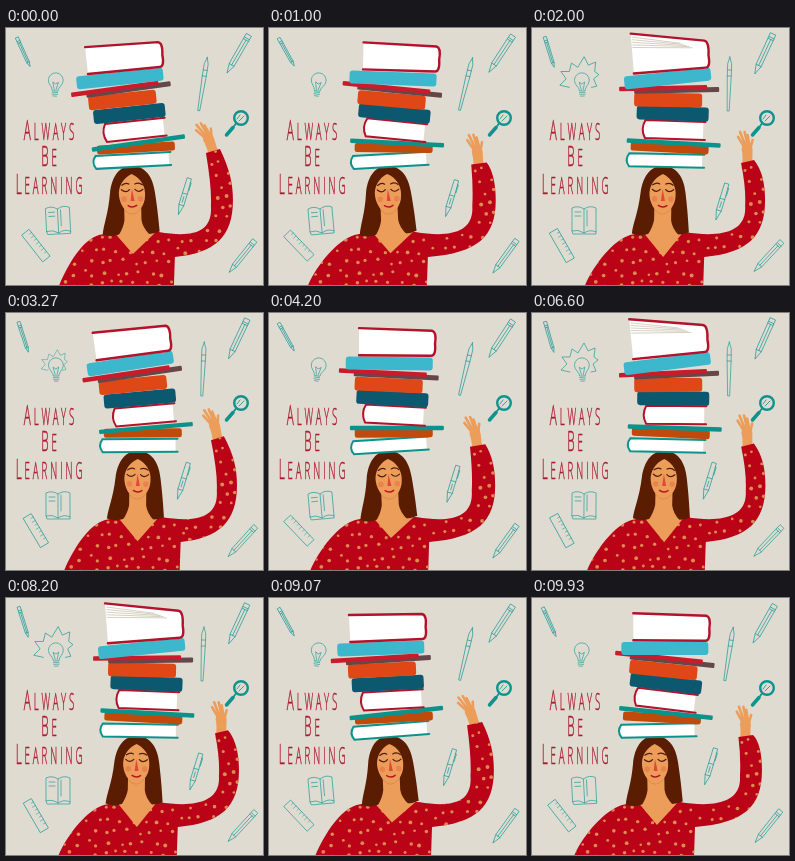
These frames come from a looping animation (257 by 257 pixels, 9990 ms). An HTML page:

```html
<!DOCTYPE html>
<html lang="en">
<head>
<meta charset="utf-8">
<title>Always Be Learning</title>
<style>
  html, body { margin: 0; width: 100%; height: 100%; overflow: hidden; background: #dfdbd0; }
  svg { display: block; width: 100vw; height: 100vh; }
  .line { fill: none; stroke: #239c9b; stroke-width: .7; stroke-linejoin: round; stroke-linecap: round; }
  .words { font: 300 23px "Open Sans", "Noto Sans", sans-serif; letter-spacing: 7px; fill: #ac1b2f; stroke: #ac1b2f; stroke-width: .5; }
  .words .cap { font-size: 28px; }
</style>
</head>
<body>
<svg id="stage" viewBox="0 0 257 257">
  <defs><clipPath id="cloth"><path id="clothClip"/></clipPath></defs>

  <g class="words" text-anchor="middle">
    <text transform="translate(44.5 112) scale(.42 1)"><tspan class="cap">A</tspan>LWAYS</text>
    <text transform="translate(44.5 138) scale(.42 1)"><tspan class="cap">B</tspan>E</text>
    <text transform="translate(44.5 166) scale(.42 1)"><tspan class="cap">L</tspan>EARNING</text>
  </g>

  <g class="line" id="icons">
    <g id="bulb">
      <path d="M-3 7C-3 3-8 1-8-4A8 8 0 0 1 8-4C8 1 3 3 3 7ZM-3 9H3M-3 11H3M-2 13H2M-1 6L-3-2L0 0L3-2L1 6"/>
    </g>
    <path id="rays" d="M-12 6L-21 4L-15-2L-20-9L-12-9L-10-17L-4-13L2-23L6-15L13-18L12-9L16-6L11-2L14 5L9 6"/>
    <g id="openBook">
      <path d="M0-11Q-6-15-12-12V11Q-6 9 0 13Q6 9 12 12V-12Q6-15 0-11V13M-9-8L-3-8M-9-4L-3-4M3-10L3 6M-12 11L-11 14L0 14L12 14V12"/>
    </g>
    <g id="ruler">
      <path d="M-4.5-17H4.500V17H-4.500Z"/>
      <path stroke-width=".5" d="M4.500-13H2M4.500-9H1M4.500-5H2M4.500-1H1M4.500 3H2M4.500 7H1M4.500 11H2"/>
    </g>
    <g id="brush">
      <path d="M0-27Q-3-20-2-14L-2-8L-1 27H1L2-8L2-14Q3-20 0-27ZM-2-14H2M-2-8H2"/>
    </g>
    <g id="pen">
      <path d="M-2-18H2L2.500-2V10L0 20L-2.500 10V-2ZM-2.500-2H2.500M-2.500 10H2.500M2-14H3V-6M0 1V7"/>
    </g>
  </g>

  <g id="hand">
    <path fill="#ed9d5a" d="M-6 7Q-4-5-6-13Q-5-19 0-20Q5-18 5-12Q4-3 6 7Z"/>
    <path fill="none" stroke="#ed9d5a" stroke-width="2.600" stroke-linecap="round"
      d="M-3-14L-9.500-25M-2-16L-7.500-30M0-17L-3-30M2-16L0-27M3-14L5-22"/>
  </g>
  <g fill="none" stroke="#10928f" stroke-linecap="round">
    <path stroke-width="3.500" d="M220.500 107L227 99.500"/>
    <path stroke-width="1.800" d="M227 99.500L230 95.500"/>
    <circle cx="235" cy="90" r="6.800" stroke-width="2.400"/>
    <path stroke-width=".8" d="M231 91L234 87M233 93L238 88"/>
  </g>

  <path id="clothShape" fill="#ba0317"/>
  <g clip-path="url(#cloth)" fill="#dc8a50">
    <g id="chestDots"/>
    <g id="armDots"/>
  </g>
  <path id="neckline" fill="#ed9d5a"/>

  <g id="head">
    <path fill="#5b1d02" d="M130 138C117 138 110 149 108 165C106 185 101 196 100 206Q109 209 117 206H143Q150 207 157 204C156 190 155 180 153 165C151 148 143 138 130 138Z"/>
    <path fill="#ed9d5a" d="M122 176H139V192Q140 200 147 207H116Q121 199 122 192Z"/>
    <path fill="#ed9d5a" d="M130 146C121 150 116 159 117 168C118 178 125 186 130 186C135 186 143 178 143 168C144 159 139 150 130 146Z"/>
    <path fill="none" stroke="#d98746" stroke-width=".8" d="M122 181.500Q130 191 138 181.500"/>
    <g fill="#e98350"><circle cx="122" cy="171" r="2.800"/><circle cx="138.500" cy="171" r="2.800"/></g>
    <path fill="none" stroke="#4a1c10" stroke-width="1.200" stroke-linecap="round"
      d="M119.500 161.500Q124 165.500 127.500 161.500M133 161.500Q136.500 165.500 141 161.500M120 157Q124 154 127 156M133 156Q137 154 140.500 157"/>
    <path fill="#e0493a" d="M130 161L128.500 173H132.500Z"/>
    <path fill="none" stroke="#b81424" stroke-width="1.500" stroke-linecap="round" d="M126 177.500Q130 180.500 134.500 177.500"/>
  </g>

  <g id="books"/>
</svg>

<script>
const LOOP = 9990, STEP = 66.6, SWAY = 1546;
const TAU = Math.PI * 2;
const $ = id => document.getElementById(id);

function make(tag, attrs = {}) {
  const el = document.createElementNS('http://www.w3.org/2000/svg', tag);
  for (const k in attrs) el.setAttribute(k, attrs[k]);
  return el;
}
const add = (parent, tag, attrs) => parent.appendChild(make(tag, attrs));
const place = (el, x, y, turn = 0, scale = 1) =>
  el.setAttribute('transform', `translate(${x} ${y}) rotate(${turn}) scale(${scale})`);
const clamp = v => Math.min(1, Math.max(0, v));
const ease = (a, b, v) => { const u = clamp((v - a) / (b - a)); return u * u * (3 - 2 * u); };

// Books, top to bottom: kind, width, height, y, colour, x and tilt in the three key poses
const books = [
  ['open', 79, 26, 29.5, '#b3122b', [118, 138, 139], [-4, -3, 2]],
  ['solid', 87, 13, 50.5, '#3cb7cb', [114, 135.5, 133], [-6, -6, 0]],
  ['pair', 90, 4.5, 61, '#c81c2c', [115, 137, 133], [-8, -1, 6]],
  ['solid', 68, 14, 72, '#df4717', [116.5, 136, 131.5], [-6, 1, 6]],
  ['solid', 72, 14, 85.5, '#0c586f', [123.5, 140.5, 134], [-6, 2, 7]],
  ['pages', 64, 18, 102, '#b3122b', [128, 141, 133], [-6, 2, 7]],
  ['solid', 94, 4.5, 115, '#0b938b', [132.5, 141.5, 134], [-8, 3, 6]],
  ['solid', 78, 9, 120, '#c04a0b', [130, 137.5, 130], [-3, 3, 3]],
  ['pages', 79, 13, 132.5, '#0b938b', [125.5, 132.5, 125], [-3, 1, -1]]
].map(([kind, w, h, y, color, xs, tilts]) => {
  const g = make('g');
  const x = w / 2, t = h / 2;
  if (kind === 'solid') add(g, 'rect', { x: -x, y: -t, width: w, height: h, rx: Math.min(3, h / 4), fill: color });
  if (kind === 'pair') {
    add(g, 'rect', { x: -x + 10, y: -1, width: w - 5, height: h + .5, rx: 1, fill: '#654649' });
    add(g, 'rect', { x: -x - 5, y: -t - 1, width: w - 2, height: h, rx: 1, fill: color });
  }
  if (kind === 'pages') {
    add(g, 'path', { fill: '#fff', d: `M${x - 2} ${-t}H${-x + 4}Q${-x - 1} 0 ${-x + 4} ${t}H${x - 2}Z` });
    add(g, 'path', { fill: 'none', stroke: color, 'stroke-width': 2, 'stroke-linecap': 'round',
      d: `M${x} ${-t}H${-x + 4}Q${-x - 1} 0 ${-x + 4} ${t}H${x}` });
  }
  const leaf = kind === 'open' && {
    pages: add(g, 'path', { fill: '#fff' }),
    lines: add(g, 'path', { fill: 'none', stroke: '#cfc6b4', 'stroke-width': .8 }),
    cover: add(g, 'path', { fill: 'none', stroke: color, 'stroke-width': 2.4, 'stroke-linecap': 'round' })
  };
  return { g, y, xs, tilts, leaf };
});
books.slice().reverse().forEach(b => $('books').append(b.g));

// Pencils: x, y, length, width, resting turn, swing
const pencils = [
  [17.5, 24, 32, 2.8, -24, 7],
  [232, 26, 44, 5.5, 30, -5],
  [236, 228.5, 41, 5, 39, 4]
].map(([x, y, len, w, turn, swing]) => {
  const a = w / 2, h = len / 2, tip = h - w * 1.7;
  const el = add($('icons'), 'path', {
    d: `M${-a} ${-h}H${a}V${tip}L0 ${h}L${-a} ${tip}ZM${-a} ${tip}H${a}M${-a} ${4 - h}H${a}M${-a} ${6 - h}H${a}M0 ${6 - h}V${tip}`
  });
  return { el, x, y, turn, swing };
});

// Blouse dots on a loose grid
let seed = 7;
const rand = () => (seed = seed * 16807 % 2147483647) / 2147483647;
for (let row = 0; row < 13; row++) {
  for (let col = 0; col < 19; col++) {
    const x = 34 + col * 11.5 + (row % 2) * 5.5 + rand() * 6, y = 121 + row * 11 + rand() * 6;
    add($(x > 172 ? 'armDots' : 'chestDots'), 'circle', { cx: x, cy: y, r: 1.3 + rand() * .7 });
  }
}

function drawLeaf({ pages, lines, cover }, open) {
  const lift = 13 * open, top = -13 - lift, right = -13 - 2 * open;
  pages.setAttribute('d', `M-38 ${top}L36 ${right}Q41 0 36 13L-37 14Z`);
  cover.setAttribute('d', `M-38 ${top}L35 ${right}Q40 ${right + 1} 38.5 0Q40 12 35 12L-37 14`);
  let d = '';
  for (let i = 1; i < 6; i++) d += `M-37 ${top + 1 + i * (1 + 1.6 * open)}L${8 + i * 3} ${right + i * 1.3}`;
  lines.setAttribute('d', d);
  lines.setAttribute('opacity', open);
}

function draw(time) {
  const turn = time / SWAY, ph = turn % 1;
  const angle = TAU * (ph + .04);
  const body = Math.sin(angle) - .3 * Math.cos(2 * angle);
  const lag = -Math.cos(TAU * ph);
  // Blend of three key poses: left, right, and returning
  const mix = (a, r, c) => {
    const k = (c - a) / 1.885;
    return a + k * (lag + 1) + body * (r - a - 1.27 * k);
  };

  for (const b of books) {
    place(b.g, mix(...b.xs), b.y, mix(...b.tilts));
    if (b.leaf) drawLeaf(b.leaf, ease(.09, .23, ph) * (1 - ease(.34, .42, ph)));
  }

  const left = mix(53, 52.5, 42), shoulder = mix(93, 98, 90), neckR = mix(153, 153, 148);
  const inner = mix(205, 213, 208), outer = mix(227, 233, 230), pit = mix(169, 172, 163);
  const cuffX = mix(200, 209, 206.5), cuffY = mix(125, 135, 139);
  const endX = mix(214, 222, 221), endY = mix(121, 132, 137);
  const cloth = `M${left} 258C${left + 9} 237 ${shoulder - 17} 212 ${shoulder} 207L${shoulder + 15} 204H${neckR}` +
    `C${neckR + 30} 209 ${inner + 2} 207 ${inner} 178Q${inner + 1} 160 ${cuffX} ${cuffY}L${endX} ${endY}` +
    `C${outer - 3} 142 ${outer} 156 ${outer} 172C${outer} 209 ${outer - 18} 225 ${pit} 229L${pit - 1} 258Z`;
  $('clothShape').setAttribute('d', cloth);
  $('clothClip').setAttribute('d', cloth);
  $('neckline').setAttribute('d',
    `M${mix(107, 110, 105)} 203L${mix(127, 131, 125)} ${mix(226, 229, 227)}L${mix(151, 152, 147)} 203Z`);
  place($('chestDots'), mix(0, 4, -4), 0);
  place($('armDots'), mix(0, 7, 4), mix(0, 6, 8));

  place($('hand'), mix(207, 215.5, 213.5), mix(123, 134, 139), mix(-18, 0, 2));
  $('head').setAttribute('transform',
    `translate(${mix(-3.5, 0, -6.5)} 0) rotate(${mix(-1, 1, -1)} 130 190)`);

  for (const p of pencils) place(p.el, p.x, p.y, p.turn + p.swing * body);
  place($('brush'), 197, 56, 9 - 7 * body);
  place($('ruler'), 30, 217.5, -38 + 8 * body);
  place($('openBook'), 52, 192, -3 + 3 * body);
  place($('bulb'), 49.5 + .5 * body, 56, 4 - 6 * body, .93);
  const drift = -Math.cos(TAU * (turn / 2 - .1));
  place($('pen'), 183.5 + 6.5 * drift, 170 + 3 * drift, 17);

  place($('rays'), 50, 53, 0, Math.min(1.06, .5 + 1.9 * ph));
  $('rays').setAttribute('opacity', ease(.03, .09, ph) * clamp((.335 - ph) / .03));
}

const start = performance.now();
function tick() {
  const t = (performance.now() - start) % LOOP;
  draw(Math.floor(t / STEP) * STEP);
  requestAnimationFrame(tick);
}
tick();
</script>
</body>
</html>
```
